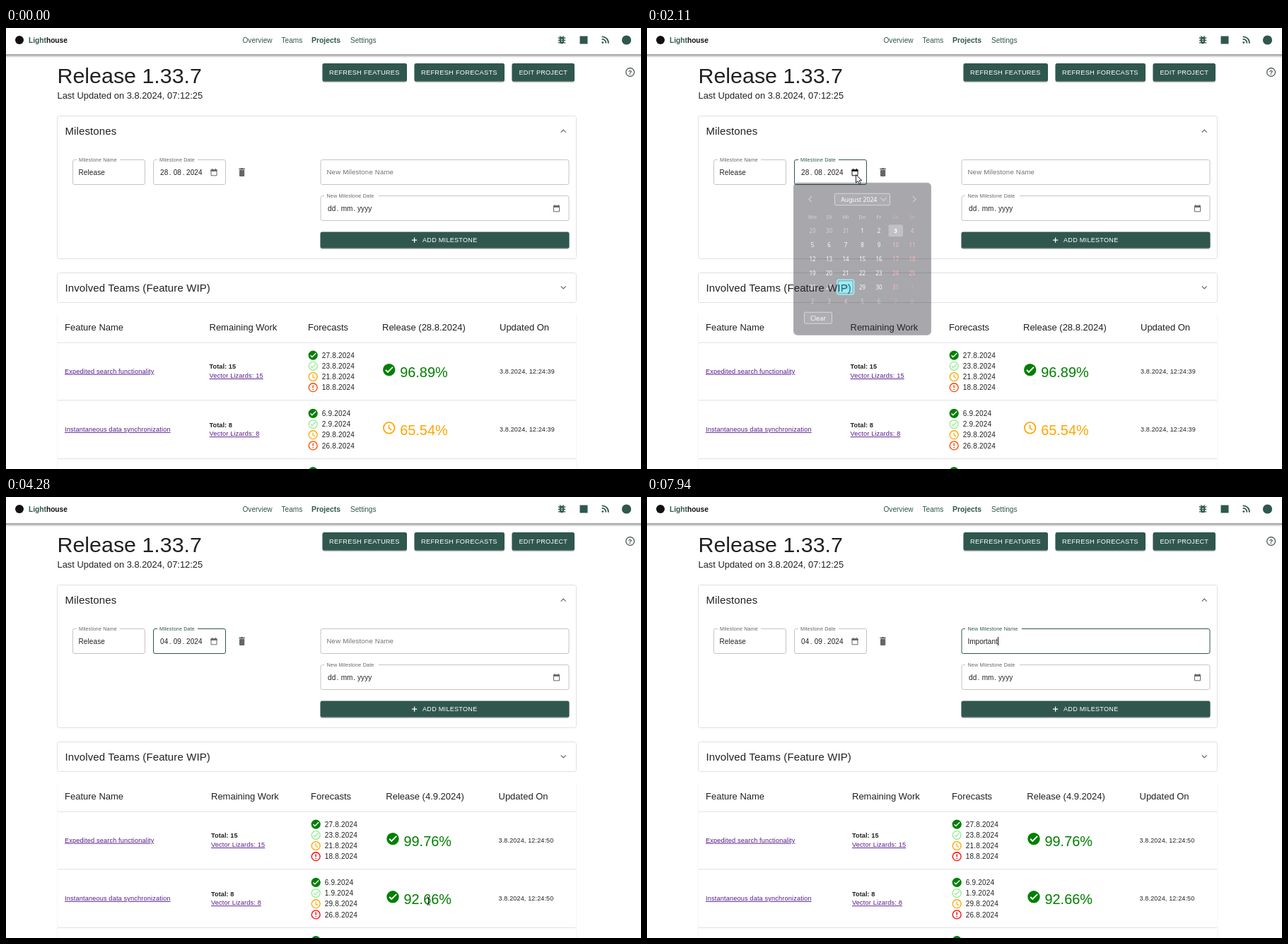
An HTML page for the animation above (8 s loop, 898 px wide and 624 px high).

```html
<!DOCTYPE html>
<html lang="en">
<head>
<meta charset="utf-8">
<title>Release forecast</title>
<style>
html, body { margin: 0; width: 100%; height: 100%; overflow: hidden; background: #fff; }
svg { display: block; width: 898px; height: 624px; font-family: "Liberation Sans", Arial, sans-serif; }
#calendar { font-family: "Noto Sans", sans-serif; text-anchor: middle; }
.link { fill: #551a8b; text-decoration: underline; }
</style>
</head>
<body>
<svg id="stage" viewBox="0 0 898 624"></svg>
<script>
const GREEN = '#30574e', INK = '#212121', GREY = '#666', EDGE = '#c4c4c4';
const LOOP = 8000;

// Markup helpers
const text = (x, y, s, size, fill = INK, more = '') =>
  `<text x="${x}" y="${y}" font-size="${size}" fill="${fill}" ${more}>${s}</text>`;
const rect = (x, y, w, h, fill, more = '') =>
  `<rect x="${x}" y="${y}" width="${w}" height="${h}" fill="${fill}" ${more}/>`;
const line = (d, color, width = 1, more = '') =>
  `<path d="${d}" fill="none" stroke="${color}" stroke-width="${width}" ${more}/>`;
const dot = (x, y, r, fill, more = '') => `<circle cx="${x}" cy="${y}" r="${r}" fill="${fill}" ${more}/>`;
const spaced = n => `letter-spacing="${n}"`;
const bold = 'font-weight="700"';

const glyphs = {
  done: c => dot(0, 0, 10, c) + line('M-5.5 .2L-2 3.7 6 -4.3', '#fff', 2.2),
  likely: c => dot(0, 0, 9, 'none', `stroke="${c}" stroke-width="2"`) + line('M-4.8 .3L-2 3.2 5.3 -4', c, 2),
  clock: c => dot(0, 0, 9, 'none', `stroke="${c}" stroke-width="2"`) + line('M-.2 -5V.6L4.2 3.2', c, 1.8),
  alert: c => dot(0, 0, 9, 'none', `stroke="${c}" stroke-width="2"`) + line('M0 -5V1M0 3V5', c, 2.2)
};
const icon = (kind, x, y, scale, color) =>
  `<g transform="translate(${x} ${y}) scale(${scale})">${glyphs[kind](color)}</g>`;

const calendarIcon = (x, y, more = '') =>
  `<g transform="translate(${x} ${y})" color="${GREY}" ${more}>` +
  line('M-4 -3.5H4V4.5H-4Z', 'currentColor') + rect(-4.5, -4, 9, 2.6, 'currentColor') +
  line('M-2.5 -5.5V-3M2.5 -5.5V-3', 'currentColor') + '</g>';

const button = (x, y, w, h, label, labelX, size) =>
  rect(x, y + 1.5, w, h, '#000', 'rx="3" opacity=".28"') + rect(x, y, w, h, GREEN, 'rx="2.5"') +
  text(labelX, y + h / 2 + 3.2, label, size, '#fff', spaced('.0286em'));

const frame = (x, y, w, h, more = '') => rect(x, y, w, h, '#fff', `rx="2.5" stroke="${EDGE}" ${more}`);
const notch = (x, y, w) => rect(x, y - 1, w, 3, '#fff');
const label = (x, y, s, more = '') => text(x, y, s, 7.2, GREY, spaced('.02em') + ' ' + more);
const card = (y, h, title) =>
  rect(72.5, y, 734, h, '#fff', 'rx="3" stroke="#e0e0e0"') + text(83.5, y + 26.5, title, 15, INK, spaced('.0075em'));

function header() {
  const rss = line('M842.6 15.9A5.2 5.2 0 0 1 848.4 21.7M842.6 12.4A8.7 8.7 0 0 1 851.9 21.7', GREEN, 1.7) +
    dot(843.8, 20.6, 1.4, GREEN);
  const bug = `<ellipse cx="786" cy="17.4" rx="3.4" ry="5" fill="${GREEN}"/>` +
    line('M780.8 14H791.2M780.8 17.4H791.2M780.8 20.8H791.2M783 11.4L785 13.4M789 11.4L787 13.4', GREEN, 1.3) +
    line('M784.8 16.2H787.2M784.8 18.8H787.2', '#fff');
  return rect(0, 36, 898, 6, 'url(#shade)') + rect(0, 0, 898, 37, '#fff') +
    dot(19, 17, 6, '#111') +
    text(32, 20.5, `<tspan fill="${GREEN}">Light</tspan>house`, 10.2, '#111', bold) +
    text(334.5, 20.5, 'Overview', 10.1, GREEN) + text(389.5, 20.5, 'Teams', 10.1, GREEN) +
    text(432, 20.5, 'Projects', 10.4, GREEN, bold) + text(487, 20.5, 'Settings', 10.1, GREEN) +
    bug + rect(811.5, 11.5, 11, 11, GREEN) + rss + dot(877.5, 17, 6.6, GREEN);
}

function page() {
  const trash = rect(330, 200.5, 7.2, 9.5, GREY, 'rx="1"') + rect(329.2, 198.7, 8.8, 1.3, GREY) +
    rect(331.8, 198, 3.6, 1, GREY);
  return header() +
    text(72.5, 78, 'Release 1.33.7', 30.4) +
    text(72.5, 100.3, 'Last Updated on 3.8.2024, 07:12:25', 12.9) +
    button(447.5, 50, 119.5, 25.5, 'REFRESH FEATURES', 457, 9.25) +
    button(577.5, 50, 127.5, 25.5, 'REFRESH FORECASTS', 587, 9.25) +
    button(715.5, 50, 88.5, 25.5, 'EDIT PROJECT', 725.5, 9.1) +
    dot(882.6, 62.5, 5.9, 'none', 'stroke="#3c4a48" stroke-width="1.2"') +
    text(882.6, 65.7, '?', 9, '#3c4a48', bold + ' text-anchor="middle"') +
    card(124.5, 202, 'Milestones') + line('M784.7 147.6L788.2 144.1 791.7 147.6', GREY, 1.2) +
    card(346.5, 42, 'Involved Teams (Feature WIP)') + line('M784.7 365.4L788.2 368.9 791.7 365.4', GREY, 1.2) +
    frame(94.5, 186.5, 102, 35) + notch(100, 186, 61) + label(103, 188.7, 'Milestone Name') +
    text(102.5, 208, 'Release', 10, INK, spaced('.1')) +
    frame(208.5, 186.5, 102, 35, 'id="dateBox"') + notch(214, 186, 57) +
    label(217, 188.7, 'Milestone Date', 'id="dateLabel"') +
    '<g id="dateText"></g>' + calendarIcon(294, 204.3, 'id="dateIcon"') + trash +
    frame(445, 186.5, 351, 35, 'id="nameBox"') + `<g id="nameNotch">${notch(450, 186, 80)}</g>` +
    label(453.5, 207.3, 'New Milestone Name', 'id="nameLabel"') +
    text(453.5, 207.7, '', 10, INK, 'id="typed"') + rect(0, 198, 1, 12, '#111', 'id="caret"') +
    frame(445, 237.5, 351, 35) + notch(450, 237, 77) + label(453.5, 239.8, 'New Milestone Date') +
    dateParts([['dd', 455], ['.', 467.5], ['mm', 473.7], ['.', 491.2], ['yyyy', 497]], 259) +
    calendarIcon(778.5, 255.3) +
    button(444.5, 288.5, 352, 23, 'ADD MILESTONE', 589, 9.1) +
    line('M574 300.2H581.2M577.6 296.6V303.8', '#fff', 1.2);
}

const dateParts = (parts, y) => parts.map(([s, x]) => text(x, y, s, 10, INK, spaced('.1'))).join('');

const blank = { work: 0, list: 0, due: 0, seen: 0 };
function table(id, x, date, time, rows, alert) {
  const out = [
    text(83, 428.4, 'Feature Name', 13), text(x.work, 428.4, 'Remaining Work', 13),
    text(x.list, 428.4, 'Forecasts', 13), text(x.due, 428.4, `Release (${date})`, 13),
    text(x.seen, 428.4, 'Updated On', 13),
    line('M72 445.2H807M72 526.8H807M72 609.5H807', '#e0e0e0'),
    line('M72.5 405V624M806.5 405V624', '#f5f5f5'),
    icon('done', x.list + 7.2, 627.6, .66, 'green')
  ];
  const kinds = [['done', 'green'], ['likely', 'lightgreen'], ['clock', 'orange'], ['alert', alert]];
  rows.forEach(([name, left, dates, percent, state, color], i) => {
    const y = i * 82.2;
    out.push(
      text(83, 488.7 + y, name, 9.2, '', 'class="link" ' + spaced('.15')),
      text(x.work, 482.4 + y, 'Total: ' + left, 9.2, INK, bold + ' ' + spaced('.05')),
      text(x.work, 495 + y, 'Vector Lizards: ' + left, 9.2, '', 'class="link" ' + spaced('.15')),
      icon(state, x.due + 9.7, 483.6 + y, .87, color),
      text(x.due + 25.2, 493.7 + y, percent, 19.9, color),
      text(x.seen, 488.7 + y, '3.8.2024, 12:24:' + time, 9, INK, spaced('.16')));
    dates.split(' ').forEach((d, n) => {
      const at = 463.1 + n * 15.2 + y;
      out.push(icon(kinds[n][0], x.list + 7.2, at, .66, kinds[n][1]),
        text(x.list + 19.8, at + 3.7, d + '.2024', 10, INK, spaced('.18')));
    });
  });
  return `<g id="${id}">${out.join('')}</g>`;
}

const colX = c => 234 + c * 23.5, rowY = r => 290 + r * 20;

function calendar() {
  const box = (x, y, w, h) => rect(x, y, w, h, '#3a3943', 'rx="1.5" stroke="#a0a0ab"');
  let s = rect(207.5, 222.5, 194, 215, '#2b2a33', 'rx="5" stroke="#3d3c46"') +
    line('M232.8 241.5L228.8 245.5 232.8 249.5M376 241.5L380 245.5 376 249.5', '#c8c8d0') +
    box(265.5, 237.5, 78, 16.5) + text(299.8, 249, 'August 2024', 8.7, '#fbfbfe') +
    line('M330.5 243.5L334.5 247.5 338.5 243.5', '#d0d0d8') +
    box(222.5, 405.5, 39, 16) + text(242, 416.8, 'Clear', 9, '#fbfbfe') +
    rect(341.5, 281.5, 20.5, 17, '#6a6a70', 'rx="1.5"') +
    rect(0, 0, 21, 17, '#52525e', 'id="hover" rx="1.5"') +
    rect(268.8, 359.3, 23.8, 21, '#2b2a33', 'rx="3" stroke="#00ddff" stroke-width="1.6"') +
    rect(271, 361.5, 19.5, 16.6, '#00ddff', 'rx="1.5"');
  'Mo Di Mi Do Fr Sa So'.split(' ').forEach((d, c) => {
    s += text(colX(c), 273, d, 7.8, c > 4 ? '#a5434b' : '#9a9aa5');
  });
  for (let i = 0; i < 42; i++) {
    const c = i % 7, inside = i > 2 && i < 34;
    const day = i < 3 ? 29 + i : inside ? i - 2 : i - 33;
    let fill = inside ? (c > 4 ? '#f0605a' : '#fbfbfe') : (c > 4 ? '#85404a' : '#8f8f9b');
    if (day === 28) fill = '#2b2a33';
    if (i === 5) fill = '#fff';
    s += text(colX(c), rowY(i / 7 | 0) + 3, day, 8, fill, i === 5 ? bold : '');
  }
  return `<g id="calendar">${s}</g>`;
}

const search = 'Expedited search functionality', sync = 'Instantaneous data synchronization';
stage.innerHTML =
  `<defs><linearGradient id="shade" x2="0" y2="1"><stop stop-color="#999"/><stop offset=".35" stop-color="#aaa"/>
  <stop offset="1" stop-color="#fff"/></linearGradient></defs>` +
  page() +
  table('oldTable', { work: 287.5, list: 427, due: 532, seen: 698 }, '28.8.2024', 39, [
    [search, 15, '27.8 23.8 21.8 18.8', '96.89%', 'done', 'green'],
    [sync, 8, '6.9 2.9 29.8 26.8', '65.54%', 'clock', 'orange']], 'orangered') +
  table('newTable', { work: 290, list: 431, due: 537.3, seen: 696.5 }, '4.9.2024', 50, [
    [search, 15, '27.8 23.8 21.8 18.8', '99.76%', 'done', 'green'],
    [sync, 8, '6.9 1.9 29.8 26.8', '92.66%', 'done', 'green']], 'red') +
  calendar() +
  `<g id="cursor"><path id="arrow" d="M0 0V11.5L2.7 9 4.6 13.3 6.6 12.4 4.7 8.3H8.3Z" fill="#fff" stroke="#1c2430"/>` +
  line('M-2.5 -5.5H-.7L0 -5 .7 -5.5H2.5M0 -5V5M-2.5 5.5H-.7L0 5 .7 5.5H2.5', '#111', 1, 'id="beam"') + '</g>';

const $ = id => document.getElementById(id);
const set = (id, attrs) => { for (const k in attrs) $(id).setAttribute(k, attrs[k]); };
const show = (id, on) => { $(id).style.display = on ? '' : 'none'; };
const clamp = v => Math.max(0, Math.min(1, v));
const mix = (a, b, p) => a + (b - a) * p;

// Pointer path: time, x, y
const path = [[260, 767, 549], [1010, 309, 211], [1080, 309, 211], [1570, 295, 207], [2440, 295, 207],
  [2510, 296, 238], [2850, 279, 395], [3580, 279, 395], [4210, 600, 538], [4280, 597, 571],
  [4810, 597, 571], [5580, 515, 202], [LOOP, 515, 202]];

function pointer(t) {
  const i = Math.max(1, path.findIndex(k => k[0] > t));
  const [a, b] = [path[i - 1], path[i]];
  let p = clamp((t - a[0]) / (b[0] - a[0]));
  if (b[0] - a[0] > 400) p = p * p * (3 - 2 * p);
  return [mix(a[1], b[1], p), mix(a[2], b[2], p)];
}

const FOCUS_DATE = 1770, PICK = 3250, UPDATE = 3920, FOCUS_NAME = 5590;
const keys = [6600, 6860, 7060, 7190, 7390, 7660, 7730, 7800, 7930];

function draw(t) {
  const [x, y] = pointer(t), visible = t >= 260 && t < keys[0];
  const over = (l, top, r, b) => visible && x >= l && x <= r && y >= top && y <= b;

  // Existing milestone date
  const dateFocus = t >= FOCUS_DATE && t < FOCUS_NAME;
  set('dateBox', { stroke: dateFocus ? GREEN : over(208, 186, 311, 222) ? INK : EDGE });
  set('dateLabel', { fill: dateFocus ? GREEN : GREY });
  set('dateIcon', { color: over(289, 198, 300, 210) ? '#111' : GREY });
  const [day, month] = t < PICK ? ['28', '08'] : ['04', '09'];
  $('dateText').innerHTML = dateParts([[day, 218], ['.', 230.8], [month, 236.7], ['.', 249.7], ['2024', 255]], 208);

  // Date picker
  const opening = clamp((t - 2015) / 235);
  show('calendar', opening > 0 && t < 3380);
  set('calendar', {
    opacity: t < PICK ? opening : .5,
    transform: `translate(0 ${-5.5 * (1 - opening)})`
  });
  const col = Math.round((x - 234) / 23.5), row = Math.round((y - 290) / 20);
  show('hover', row >= 0 && row < 6 && col >= 0 && col < 7);
  set('hover', { x: colX(col) - 10.5, y: rowY(row) - 8.5 });

  // Table
  show('oldTable', t < UPDATE);
  show('newTable', t >= UPDATE);

  // New milestone name
  const nameFocus = t >= FOCUS_NAME, overName = over(445, 186, 796, 222);
  const rise = 1 - (1 - clamp((t - FOCUS_NAME) / 200)) ** 3;
  set('nameBox', { stroke: nameFocus ? GREEN : overName ? INK : EDGE });
  set('nameLabel', { y: mix(207.3, 188.7, rise), 'font-size': mix(9.6, 7.2, rise), fill: nameFocus ? GREEN : '#707070' });
  show('nameNotch', nameFocus);
  $('typed').textContent = 'Important'.slice(0, keys.filter(k => t >= k).length);
  show('caret', nameFocus && (t < 6070 || t >= keys[0]));
  set('caret', { x: 454 + Math.round($('typed').getComputedTextLength()) });

  // Pointer
  const beam = overName || (t >= 4250 && t < 4900);
  show('cursor', visible);
  show('beam', beam);
  show('arrow', !beam);
  set('cursor', { transform: `translate(${Math.round(x) + .5} ${Math.round(y) + .5})` });
}

function tick() {
  draw(performance.now() % LOOP);
  requestAnimationFrame(tick);
}
tick();
</script>
</body>
</html>
```
